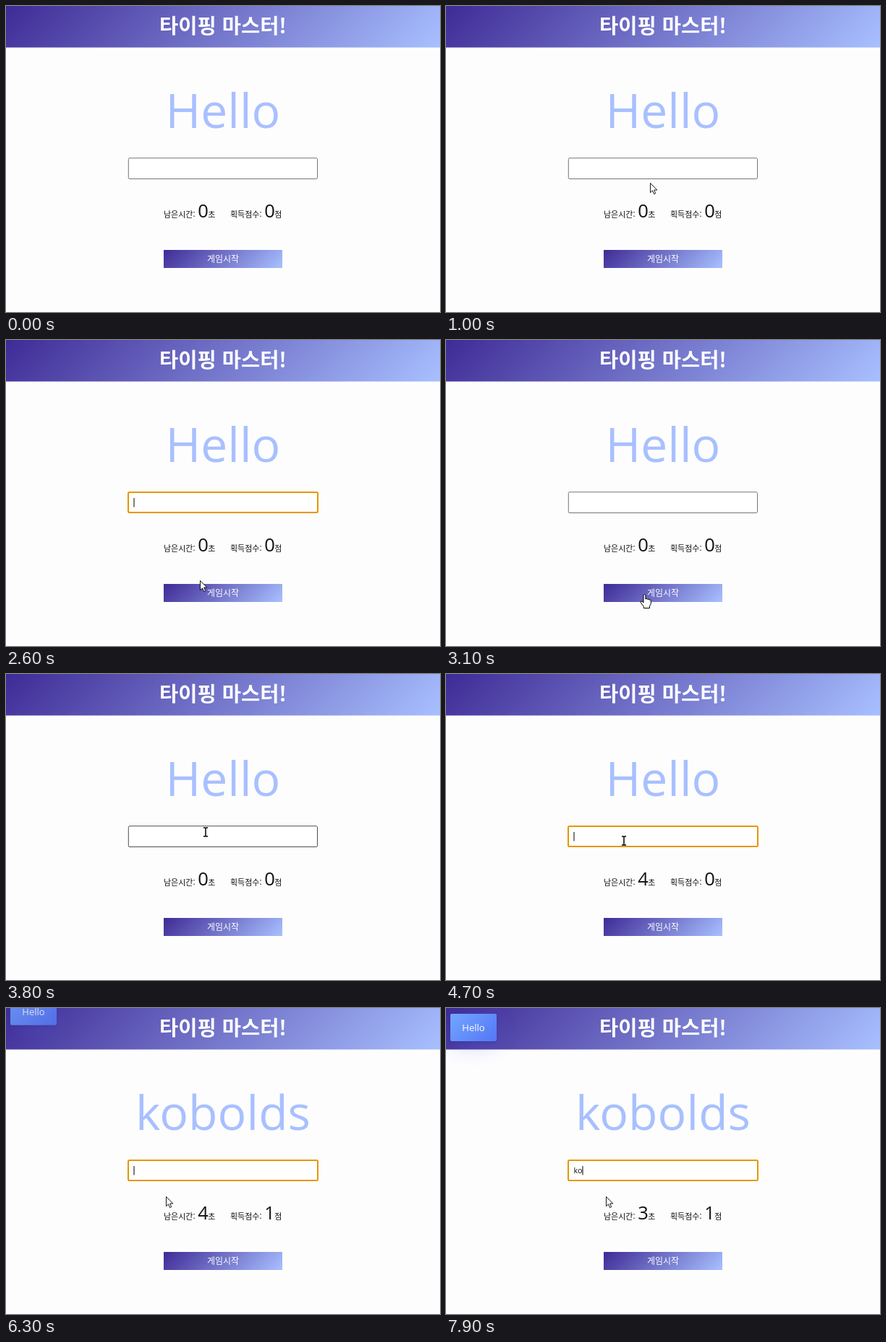
Write an HTML page that moves like this. It is 600 px wide and 424 px high and loops after 8000 ms.

```html
<!DOCTYPE html>
<html lang="ko">
<head>
<meta charset="utf-8">
<title>타이핑 게임</title>
<style>
  html, body { margin: 0; width: 100%; height: 100%; overflow: hidden; background: #fefdfe; }
  svg { position: absolute; left: 0; top: 0; display: block; }
  text { font-family: "Open Sans", "Noto Sans", sans-serif; fill: #111; }
  .ko { font-family: "Noto Sans CJK KR", "Noto Sans CJK", "Noto Sans KR", sans-serif; }
  .mid { text-anchor: middle; }
  .small { font-size: 11px; }
  .num { font-size: 25.5px; text-anchor: middle; }
  #toast {
    position: absolute; left: 6px; top: 8px; width: 64px; height: 38px;
    border-radius: 2px; background: linear-gradient(135deg, #73a5ff, #5477f5);
    box-shadow: 0 2.6px 5px -1px rgba(0,0,0,.12), 0 8.6px 31px -3.4px rgba(77,96,232,.3);
    color: #fff; font: 13px/38px "Open Sans", "Noto Sans", sans-serif; text-align: center;
  }
</style>
</head>
<body>
<svg width="600" height="424" viewBox="0 0 600 424">
  <defs>
    <linearGradient id="head" gradientUnits="userSpaceOnUse" x1="136" y1="-135" x2="464" y2="193">
      <stop stop-color="#3f2b96"/><stop offset="1" stop-color="#a8c0ff"/>
    </linearGradient>
    <linearGradient id="btn" gradientUnits="userSpaceOnUse" x1="252.75" y1="303.25" x2="347.25" y2="397.75">
      <stop stop-color="#3f2b96"/><stop offset="1" stop-color="#a8c0ff"/>
    </linearGradient>
  </defs>

  <rect width="600" height="57.5" fill="url(#head)"/>
  <text class="ko mid" x="300" y="38" font-size="28.5" font-weight="700" style="fill:#fff">타이핑 마스터!</text>
  <text id="word" class="mid" x="300" y="169" font-size="66" style="fill:#a8c0ff"></text>

  <rect id="field" fill="#fff"/>
  <text id="typed" x="176.5" y="229" font-size="10.8"></text>
  <rect id="caret" y="219" width="1" height="12.5" fill="#000"/>

  <text class="ko small" x="218" y="293">남은시간:</text>
  <text id="time" class="num" x="272.5" y="293"></text>
  <text class="ko small" x="279.3" y="293">초</text>
  <text class="ko small" x="310" y="293">획득점수:</text>
  <text id="score" class="num" x="364.5" y="293"></text>
  <text class="ko small" x="371.3" y="293">점</text>

  <rect x="218" y="338" width="164" height="25" fill="url(#btn)"/>
  <text class="ko mid" x="300" y="355" font-size="12" style="fill:#fff">게임시작</text>

  <g id="pointer" stroke="#000" stroke-linejoin="round">
    <path id="arrow" fill="#fff" stroke-width=".9"
      d="M.5 .5V13.6L3.5 10.8L5.6 15.6L7.7 14.7L5.7 10H9.8Z"/>
    <path id="hand" fill="#fff" stroke-width="1"
      d="M-1.5 1.4Q0 -.4 1.4 1.4V7Q3 5.7 4.1 7.3Q5.7 6.3 6.6 8Q8.5 7.4 8.8 9.4V13.5L7 16.8V19.5H-1.2V17.2L-5.4 11.6Q-5.6 9.2 -3.4 10.1L-1.5 12Z"/>
    <path id="beam" fill="none" stroke-width="1.5"
      d="M-3 -6H-.9L0 -5.2L.9 -6H3M0 -5.2V5.2M-3 6H-.9L0 5.2L.9 6H3"/>
  </g>
</svg>
<div id="toast">Hello</div>

<script>
const LOOP = 8000, STEP = 100;
const $ = id => document.getElementById(id);
const [word, field, typed, caret, time, score, pointer, toast] =
  ["word", "field", "typed", "caret", "time", "score", "pointer", "toast"].map($);
const shapes = ["arrow", "hand", "beam"].map($);

// Pointer path: time, x, y
const path = [
  [500, 298, 381], [1000, 282, 245], [1200, 276, 228], [2300, 276, 228],
  [2600, 268, 333], [3100, 274.5, 352], [3400, 274.5, 352], [3800, 276, 219],
  [4000, 276, 219], [4200, 246, 231], [4700, 246, 231], [4900, 221, 261]
];
const typing = [[0, ""], [5500, "h"], [5600, "he"], [5700, "hel"], [5900, "hell"],
  [6100, ""], [7600, "k"], [7900, "ko"]];
const seconds = [[0, 0], [4200, 4], [5200, 3], [6200, 4], [7200, 3]];
const focusOn = [[1400, 3000], [4600, LOOP]];
const caretOn = [[1400, 2100], [2500, 3000], [4600, 5300], [5500, 6700], [7200, LOOP]];

const latest = (list, t) => list.filter(k => k[0] <= t).pop()[1];
const within = (list, t) => list.some(([a, b]) => t >= a && t < b);
const show = (el, on) => { el.style.display = on ? "" : "none"; };
const inside = (x, y, l, t, r, b) => x >= l && x <= r && y >= t && y <= b;
const set = (el, attrs) => { for (const k in attrs) el.setAttribute(k, attrs[k]); };

function pointerAt(t) {
  const i = path.findIndex(k => k[0] > t);
  if (i < 0) return path[path.length - 1].slice(1);
  const a = path[Math.max(0, i - 1)], b = path[i];
  const p = Math.max(0, (t - a[0]) / (b[0] - a[0]));
  return [a[1] + (b[1] - a[1]) * p, a[2] + (b[2] - a[2]) * p];
}

function drawField(focused, hover) {
  set(field, focused
    ? { x: 169, y: 211, width: 262, height: 28, rx: 1.8, stroke: "#e59700", "stroke-width": 2 }
    : { x: 169.3, y: 210.7, width: 261.2, height: 28.8, rx: 1.7,
        stroke: hover ? "#4f4f4f" : "#767676", "stroke-width": 1 });
}

function draw(t) {
  const won = t >= 6100;
  word.textContent = won ? "kobolds" : "Hello";
  score.textContent = won ? 1 : 0;
  time.textContent = latest(seconds, t);

  const text = latest(typing, t);
  typed.textContent = text;
  caret.setAttribute("x", 176.5 + (text ? typed.getComputedTextLength() : 0));
  show(caret, within(caretOn, t));

  const [x, y] = pointerAt(t);
  const hover = t >= 500 && inside(x, y, 169, 210, 431, 240);
  const kind = hover ? 2 : inside(x, y, 218, 338, 382, 363) ? 1 : 0;
  show(pointer, t >= 500);
  pointer.setAttribute("transform", `translate(${x} ${y})`);
  shapes.forEach((s, i) => show(s, i === kind));
  drawField(within(focusOn, t), hover);

  // Toast drops in with a cubic ease-out
  const left = 1 - Math.min(1, Math.max(0, (t - 6116) / 400));
  const rest = left ** 3;
  show(toast, rest < 1);
  toast.style.transform = `translateY(${-142 * rest}px)`;
  toast.style.opacity = 1 - rest;
}

const start = performance.now();
function tick() {
  const t = (performance.now() - start) % LOOP;
  draw(Math.floor(t / STEP) * STEP);
  requestAnimationFrame(tick);
}
tick();
</script>
</body>
</html>
```
